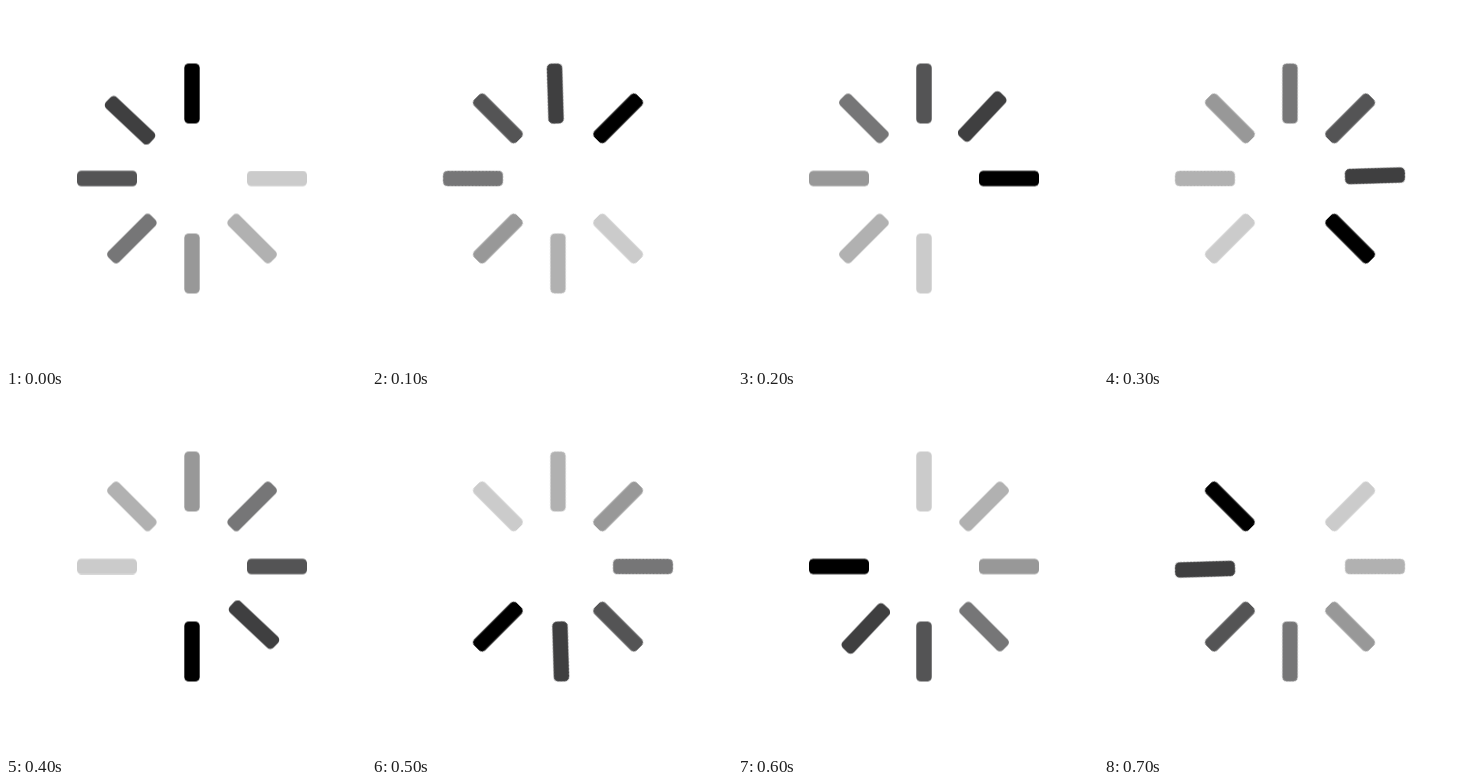
Write an HTML page that moves like this. It is 360 by 360 pixels and loops after 800 ms.

```html
<!DOCTYPE html>
<html lang="en">
<head>
<meta charset="utf-8">
<title>Spinner</title>
<style>
  html, body { margin: 0; width: 100%; height: 100%; overflow: hidden; background: #fff; }
  svg { display: block; width: 100%; height: 100%; }
</style>
</head>
<body>
<svg viewBox="0 0 360 360">
  <g transform="translate(186 172.5)"><g id="wheel"></g></g>
</svg>
<script>
  const SPOKES = 8;
  const LOOP = 800;
  const LAG = 1.8; // the bar right behind the head trails by a few degrees
  const shades = ['#000', '#3f3f40', '#545455', '#767677', '#989898', '#b1b1b1', '#cbcbcb'];
  const wheel = document.getElementById('wheel');

  function addBar(fill, angle) {
    const bar = document.createElementNS('http://www.w3.org/2000/svg', 'rect');
    const attrs = {
      x: -7.7, y: -115, width: 15.4, height: 60, rx: 4.5,
      fill, transform: `rotate(${angle})`
    };
    for (const name in attrs) bar.setAttribute(name, attrs[name]);
    wheel.append(bar);
  }

  shades.forEach((fill, i) => addBar(fill, -i * 360 / SPOKES - (i === 1 ? LAG : 0)));

  wheel.animate(
    [{ transform: 'rotate(0deg)' }, { transform: 'rotate(360deg)' }],
    { duration: LOOP, iterations: Infinity, easing: `steps(${SPOKES}, end)` }
  );
</script>
</body>
</html>
```
